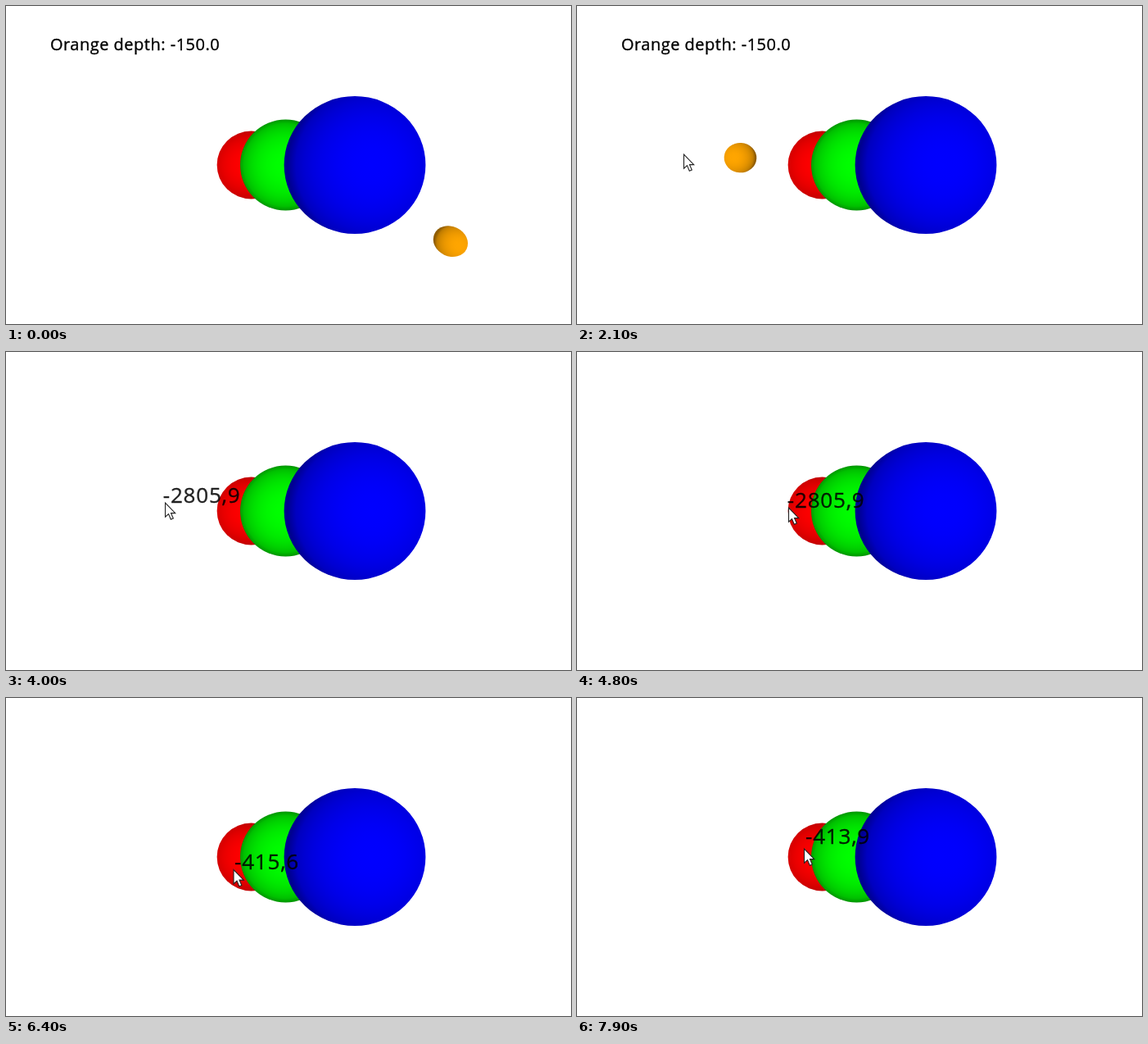
An HTML page with a canvas that plays this animation: 690 by 388 pixels, repeating every 8000 ms.

```html
<!DOCTYPE html>
<html lang="en">
<head>
<meta charset="utf-8">
<title>Sphere depth</title>
<style>
  html, body { margin: 0; width: 100%; height: 100%; overflow: hidden; background: #fff; }
  canvas { display: block; }
</style>
</head>
<body>
<canvas id="stage" width="690" height="388"></canvas>
<script>
const ctx = document.getElementById('stage').getContext('2d');
const LOOP = 8000, STEP = 100, ENTER = 600, PICK_START = 3200;
const CENTER = { x: 345, y: 194 };
const FOCAL = 194 / Math.tan(Math.PI / 6);
const ORANGE_SCALE = 0.68;

// Turning points of the pointer: time, x, y
const path = [
  [500, 636, 331], [1000, 402, 178], [1100, 402, 178], [1300, 342, 135],
  [1400, 292, 120], [2000, 131, 181], [3400, 131, 181], [4000, 195, 184],
  [4800, 259, 190], [6400, 278.5, 209.5], [7750, 278, 161.5], [7900, 278, 184]
];

function pointerAt(t) {
  const next = path.findIndex(key => key[0] >= t);
  const [t1, x1, y1] = path[next];
  const [t0, x0, y0] = path[Math.max(0, next - 1)];
  const k = t1 > t0 ? (t - t0) / (t1 - t0) : 0;
  return { x: x0 + (x1 - x0) * k, y: y0 + (y1 - y0) * k };
}

// Perspective stretches a sphere away from the view center and moves its highlight outward.
function sphere(x, y, r, rgb) {
  const dx = x - CENTER.x, dy = y - CENTER.y;
  const d = Math.hypot(dx, dy), ray = Math.hypot(d, FOCAL);
  const lean = d / ray;
  const shade = ctx.createRadialGradient(lean, 0, 0, lean, 0, 1 + lean * 0.8);
  for (let s = 0; s <= 10; s++) {
    const light = 0.56 + 0.44 * Math.sqrt(1 - (s / 10) ** 2);
    shade.addColorStop(s / 10, `rgb(${rgb.map(c => Math.round(c * light))})`);
  }
  ctx.save();
  ctx.translate(x, y);
  ctx.rotate(Math.atan2(dy, dx));
  ctx.scale(r * ray / FOCAL, r);
  ctx.fillStyle = shade;
  ctx.beginPath();
  ctx.arc(0, 0, 1, 0, Math.PI * 2);
  ctx.fill();
  ctx.restore();
}

function orangeSphere(mouse) {
  sphere(CENTER.x + (mouse.x - CENTER.x) * ORANGE_SCALE,
    CENTER.y + (mouse.y - CENTER.y) * ORANGE_SCALE, 18.2, [255, 165, 0]);
}

function text(str, x, y, size, spacing, color) {
  ctx.font = `${size}px "Open Sans", "Noto Sans", sans-serif`;
  ctx.letterSpacing = spacing + 'px';
  ctx.fillStyle = ctx.strokeStyle = color;
  ctx.lineWidth = 0.35;
  ctx.fillText(str, x, y);
  ctx.strokeText(str, x, y);
}

// Depth under the pointer: the red sphere or the far background
function depthAt({ x, y }) {
  const d2 = ((x - 299.5) ** 2 + (y - 192.76) ** 2) / 41.5 ** 2;
  const depth = d2 < 1 ? -491.66 + 100 * Math.sqrt(1 - d2) : -2805.9;
  return depth.toFixed(1).replace('.', ',');
}

const arrow = new Path2D('M0 0V17.2L4 13.6L6.8 20.2L9.8 19L7 12.6H12.2Z');

function cursor({ x, y }) {
  ctx.save();
  ctx.translate(x - 0.5, y);
  ctx.fillStyle = '#fff';
  ctx.fill(arrow);
  ctx.strokeStyle = '#222';
  ctx.lineWidth = 1.1;
  ctx.stroke(arrow);
  ctx.restore();
}

function draw(now) {
  const t = Math.floor(now % LOOP / STEP) * STEP;
  const picking = t >= PICK_START;
  ctx.fillStyle = '#fff';
  ctx.fillRect(0, 0, 690, 388);

  sphere(299.5, 194, 41.5, [255, 0, 0]);
  sphere(341.5, 194, 55.5, [0, 255, 0]);
  if (!picking) orangeSphere(pointerAt(t - STEP));
  sphere(426, 194, 84, [0, 0, 255]);

  if (picking) {
    const mouse = pointerAt(t - 40);
    text(depthAt(mouse), mouse.x + 1, mouse.y, 26, 0.8, 'rgba(0,0,0,.85)');
  } else {
    text('Orange depth: -150.0', 54, 54, 20, 0.5, '#000');
  }
  if (t >= ENTER) cursor(pointerAt(t));
  requestAnimationFrame(draw);
}
requestAnimationFrame(draw);
</script>
</body>
</html>
```
